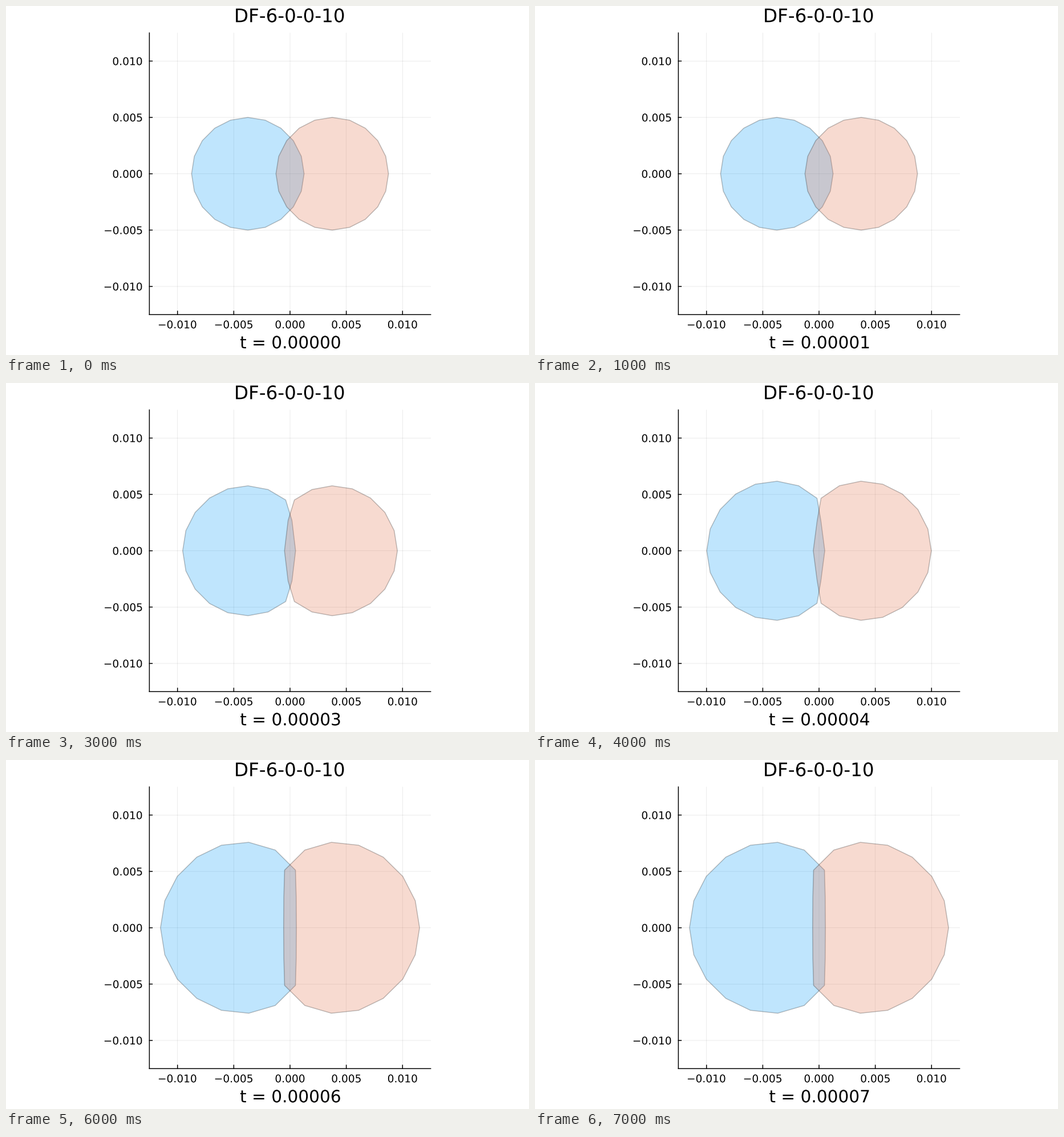
A matplotlib script for the animation above (8 s loop, 917 by 611 pixels).

```python
import numpy as np
import matplotlib.pyplot as plt
from matplotlib.animation import FuncAnimation
from matplotlib.patches import PathPatch, Polygon
from matplotlib.path import Path
from matplotlib.textpath import TextPath

W, H, DPI = 917, 611, 64
CX, CY = 498.0, 293.7        # plot centre in pixels
HALF = 246.6                 # half the plot side
UNIT = HALF / 12.5           # pixels per 0.001
OFFSET = 3.75 * UNIT         # distance of each blob from the centre
BLUE, RED = (0, 154 / 255, 250 / 255), (227 / 255, 111 / 255, 71 / 255)
STEPS = 8

plt.rcParams["text.kerning_factor"] = 6   # letters spaced without kerning


def px(pixels):
    return pixels * 72 / DPI


def growth(step):
    """Growth rounds done: one late at first, caught up by a double round."""
    return step - 1 + (step == 6) if step else 0


def blob(n):
    """Left blob after n rounds, relative to the plot centre, y upwards."""
    k = np.arange(11)
    # Growth is held back, and vertices drift, towards the contact side.
    lag = max(n - 1, 0) * 0.029 * 0.4 ** (k - 3.0)
    lag[:3] = 0
    radius = 5 * UNIT * 1.0761 ** n * (1 - lag)
    angle = np.radians(18 * k - 25 * lag)
    x, y = radius * np.cos(angle) - OFFSET, radius * np.sin(angle)
    if n:
        # The contact side is flattened, sagging away from its middle.
        face = np.interp(n, [1, 2, 6], [-0.4, 9.7, 11.2])
        sag = np.interp(n, [1, 4, 6], [5.8, 7.5, 0.4])
        x[:3] = face - sag * k[:3] / 2
        y[:3] = 26.6 * k[:3]
    upper = np.column_stack([x, y])
    return np.vstack([upper, upper[-2:0:-1] * (1, -1)])


def text_path(text, size, x, base, align="center"):
    """Text outline aligned by its ink, baseline at the given pixel row."""
    path = TextPath((0, 0), text, size=size, prop={"family": "DejaVu Sans"})
    box = path.get_extents()
    anchor = box.x1 if align == "right" else (box.x0 + box.x1) / 2
    return Path(path.vertices * (1, -1) + (x - anchor, base), path.codes)


def add_text(*args, **kwargs):
    patch = PathPatch(text_path(*args, **kwargs), fc="black", lw=0)
    return ax.add_patch(patch)


def clock_path(step):
    return text_path(f"t = {step * 1e-5:.5f}", 29.6, 498.3, 599.3)


def line(x, y, width=1.5, alpha=1, z=4):
    ax.plot(x, y, color="black", lw=px(width), alpha=alpha, zorder=z,
            solid_capstyle="projecting", snap=False)


def add_blob(color, z):
    return ax.add_patch(Polygon(blob(0), closed=True, fc=(*color, 0.25),
                                ec=(0, 0, 0, 0.25), lw=px(1.5), zorder=z,
                                snap=False))


fig = plt.figure(figsize=(W / DPI, H / DPI), dpi=DPI, facecolor="white")
ax = fig.add_axes([0, 0, 1, 1])
ax.set_xlim(0, W)
ax.set_ylim(H, 0)
ax.axis("off")

left, right, top, bottom = CX - HALF, CX + HALF, CY - HALF, CY + HALF
for tick in range(-10, 11, 5):
    x, y = CX + tick * UNIT, CY - tick * UNIT
    line([x, x], [top, bottom], 0.8, 0.1, 1)
    line([left, right], [y, y], 0.8, 0.1, 1)
    line([x, x], [bottom, bottom - 6])
    line([left, left + 5], [y, y])
    label = f"{tick / 1000:.3f}".replace("-", "\u2212")
    add_text(label, 18.6, x, 564.3)
    add_text(label, 18.6, 238.4, y + 7, align="right")
line([left, left], [top, bottom])
line([left, right], [bottom, bottom])

add_text("DF-6-0-0-10", 32.6, 497.8, 28.3)
clock = ax.add_patch(PathPatch(clock_path(0), fc="black", lw=0))
blue, red = add_blob(BLUE, 2), add_blob(RED, 3)


def update(step):
    points = blob(growth(step))
    blue.set_xy(points * (1, -1) + (CX, CY))
    red.set_xy(points * (-1, -1) + (CX, CY))
    clock.set_path(clock_path(step))
    return blue, red, clock


anim = FuncAnimation(fig, update, frames=STEPS, interval=1000,
                     repeat=True, repeat_delay=0)
plt.show()
```
